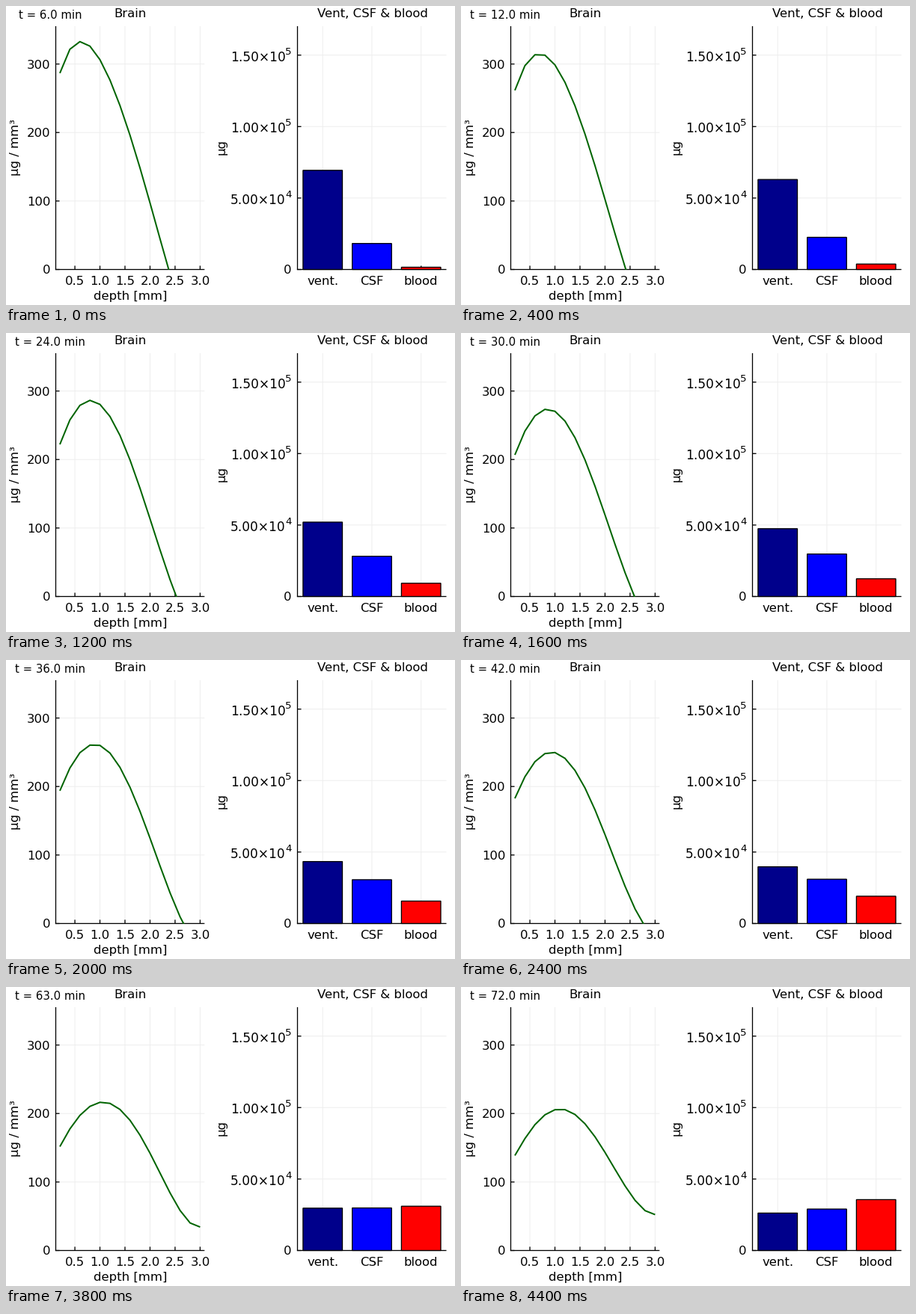
A matplotlib script that plays this animation: 600x400 px, repeating every 4600 ms.

```python
import matplotlib.pyplot as plt
import numpy as np
from matplotlib.animation import FuncAnimation
from matplotlib.patches import Rectangle

W, H, DPI = 600, 400, 100
FRAMES, STEP = 23, 200
PT = 72 / DPI
BASE, TOP = 352.5, 27
FONT = 16.45

# Key points: one row per key minute, polynomials run between them
KEY_MINUTES = [6, 18, 42, 72]
KEY_DEPTHS = [0.2, 0.6, 1.2, 2.0, 2.6, 3.0]
TISSUE = [
    [287, 333, 277, 97.5, -54, -116],
    [240.5, 296, 269, 108, -27, -86],
    [183, 236.5, 241.5, 130, 21.5, -19],
    [139, 184, 206, 143.5, 73.5, 52.7],
]
AMOUNTS = [[69.4, 18.2, 1.6], [57.2, 25.8, 6.4],
           [39.7, 31.0, 19.1], [26.2, 29.0, 35.6]]  # 1e3 µg


def blend(nodes, x):
    """Lagrange weights of the nodes at every x."""
    x = np.asarray(x)[:, None]
    cols = []
    for i, n in enumerate(nodes):
        rest = np.array(nodes[:i] + nodes[i + 1:])
        cols.append(np.prod((x - rest) / (n - rest), axis=1))
    return np.array(cols).T


depth = np.linspace(0.2, 3.0, 15)
minutes = 6 + 3.0 * np.arange(FRAMES)
in_time = blend(KEY_MINUTES, minutes)
tissue = in_time @ np.array(TISSUE) @ blend(KEY_DEPTHS, depth).T
amounts = in_time @ np.array(AMOUNTS)


def depth_x(d):
    return 58.6 + 66.93 * d


def conc_y(c):
    return BASE - 0.9163 * c


def amount_y(a):
    return BASE - 1.912 * a


plt.rcParams["font.family"] = "DejaVu Sans"
fig = plt.figure(figsize=(W / DPI, H / DPI), dpi=DPI, facecolor="white")
ax = fig.add_axes([0, 0, 1, 1])
ax.set_xlim(0, W)
ax.set_ylim(H, 0)
ax.axis("off")


def label(x, y, s, ha="center", size=FONT, **kw):
    return ax.text(x, y, s, ha=ha, va="baseline", fontsize=size * PT,
                   color="black", **kw)


def stroke(xs, ys, color="black", width=1.3, z=2):
    return ax.plot(xs, ys, color=color, lw=width * PT, zorder=z,
                   solid_capstyle="butt", snap=False)[0]


def panel(left, right, xticks, yticks):
    for x in xticks:
        stroke([x, x], [TOP, BASE], "#eeeeee", 1, 1)
        stroke([x, x], [BASE, BASE - 5])
    for y in yticks:
        if y < BASE:
            stroke([left, right], [y, y], "#eeeeee", 1, 1)
        stroke([left, left + 5], [y, y])
    stroke([left, left], [TOP, BASE + 0.6])
    stroke([left - 0.6, right], [BASE, BASE])


# Depth profile
depth_ticks = np.arange(0.5, 3.1, 0.5)
conc_ticks = np.arange(0, 301, 100)
panel(66.5, 265.3, depth_x(depth_ticks), conc_y(conc_ticks))
for d in depth_ticks:
    label(depth_x(d), 373, f"{d:.1f}")
for c in conc_ticks:
    label(59.3, conc_y(c) + 6, str(c), "right")
label(165.5, 15, "Brain")
label(166, 393.5, "depth [mm]")
label(17, 189, "µg / mm³", rotation=90, rotation_mode="anchor")
clock = label(59, 17, "", size=14.9)
curve = stroke([], [], "#006400", 2, 3)
curve.set_solid_joinstyle("round")
curve.set_clip_path(Rectangle((66.5, TOP), 198.8, BASE - TOP,
                              transform=ax.transData))

# Compartment bars
centers = 423.2 + 65.75 * np.arange(3)
levels = np.arange(0, 151, 50)
panel(389.5, 588.5, centers, amount_y(levels))
label(381.8, BASE + 6, "0", "right")
for a, mantissa, power in zip(levels[1:], ("5.00", "1.00", "1.50"), "455"):
    y = amount_y(a)
    label(373.5, y + 8, mantissa + "×10", "right", 17)
    label(381.8, y - 1, power, "right", 13.4)
label(489.5, 15, "Vent, CSF & blood")
label(293, 188.5, "µg", rotation=90, rotation_mode="anchor")
bars = []
for x, name, color in zip(centers, ("vent.", "CSF", "blood"),
                          ("#00008b", "#0000ff", "#ff0000")):
    label(x, 373, name)
    bars.append(ax.add_patch(Rectangle((x - 26.3, BASE), 52.6, 0, fc=color,
                                       ec="black", lw=1.3 * PT, zorder=3,
                                       snap=False)))


def draw(i):
    clock.set_text(f"t = {minutes[i]:.1f} min")
    curve.set_data(depth_x(depth), conc_y(tissue[i]) + 0.3)
    for bar, a in zip(bars, amounts[i]):
        bar.set_height(amount_y(a) - BASE)
    return [clock, curve, *bars]


anim = FuncAnimation(fig, draw, frames=FRAMES, interval=STEP, repeat=True,
                     repeat_delay=0, init_func=lambda: draw(0))
plt.show()
```
